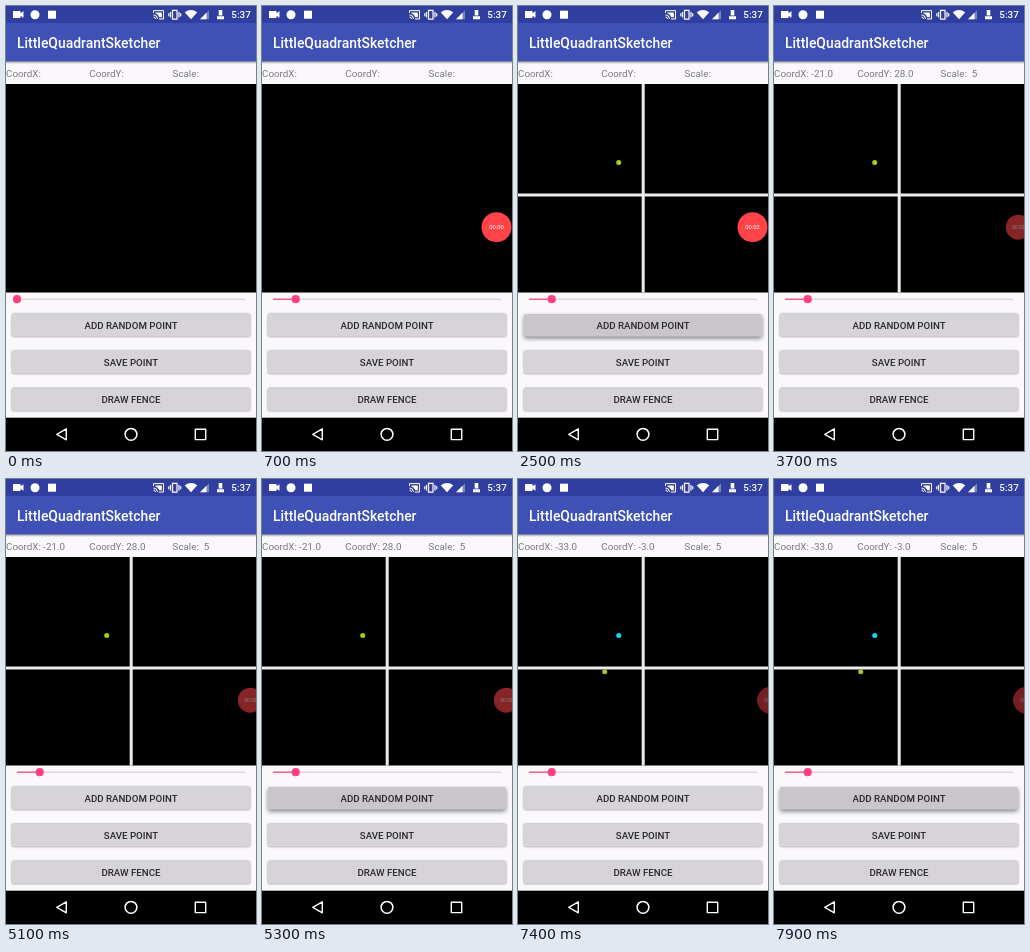
These frames come from a looping animation (250x445 px, 8000 ms). An HTML page:

```html
<!DOCTYPE html>
<html lang="en">
<head>
<meta charset="utf-8">
<title>Point plotter</title>
<style>
  html, body { margin: 0; width: 100%; height: 100%; overflow: hidden; background: #faf8fb; }
  svg { display: block; width: 100%; height: 100%; font-family: Roboto, sans-serif; }
  text { white-space: pre; }
  .label { font-size: 9.8px; fill: #7a787b; }
  .button rect { fill: #d6d4d7; filter: drop-shadow(0 .9px 1px #0007); }
  .button text { font-size: 9.7px; font-weight: 500; fill: #2a282b; text-anchor: middle; }
  .pressed rect { fill: #c9c6ca; filter: drop-shadow(0 2.2px 2px #0007); }
  .outline { fill: none; stroke: #fff; }
</style>
</head>
<body>
<svg viewBox="0 0 250 445" preserveAspectRatio="none">
  <defs>
    <linearGradient id="shade" x2="0" y2="1">
      <stop stop-color="#000" stop-opacity=".35"/>
      <stop offset="1" stop-color="#000" stop-opacity="0"/>
    </linearGradient>
  </defs>
  <rect width="250" height="445" fill="#faf8fb"/>
  <rect y="16" width="250" height="39.5" fill="#3f51b5"/>
  <rect width="250" height="17" fill="#303f9f"/>
  <rect y="55.5" width="250" height="2.5" fill="url(#shade)"/>

  <g id="status" fill="#fff">
    <path d="M7 5h7.5v2.3l3-2v6.4l-3-2V12H7z"/>
    <circle cx="29" cy="8.7" r="4.5"/>
    <rect x="42" y="4.7" width="8" height="8"/>
    <path class="outline" d="M147.5 7V4.6H157.5V13H153M147.5 9a4 4 0 0 1 4 4M147.5 11a2 2 0 0 1 2 2"/>
    <path d="M149.5 6.5h6.3v4.8h-2.5q-1-3-3.8-3.7z"/>
    <path class="outline" stroke-width="1.2" d="M166.5 4.3H171V13.2H166.5zM164.5 6v5.500M173 6v5.500M162.800 7.300v3M174.700 7.300v3"/>
    <path d="M178.700 6.200q6.300-4.500 12.600 0l-6.300 7z"/>
    <path d="M194 13.300l9-9v9z" fill-opacity=".35"/>
    <path d="M194 13.300l6.500-6.500v6.500z"/>
    <path d="M212.700 4h3.600v5.500h-3.600zM211 10.300h7v3h-7z"/>
    <text x="225.300" y="12.200" font-size="9.900" font-weight="500">5:37</text>
  </g>
  <text x="11" y="41.500" font-size="13.900" font-weight="500" fill="#fff">LittleQuadrantSketcher</text>

  <text class="label" id="coordX" x="0" y="70.500"></text>
  <text class="label" id="coordY" x="83.300" y="70.500"></text>
  <text class="label" id="scale" x="166.600" y="70.500"></text>

  <rect y="78" width="250" height="208.500" fill="#000"/>
  <path id="axes" d="M125.200 78V286.500M0 189H250" stroke="#eeeaed" stroke-width="3"/>
  <circle id="pointA" cx="100.700" cy="156.500" r="2.500"/>
  <circle id="pointB" cx="86.700" cy="192.700" r="2.500" fill="#a9c41a"/>

  <path d="M11 293.200H239" stroke="#cbc8cc"/>
  <path id="progress" stroke="#ff4081" stroke-width="1.200"/>
  <circle id="thumb" cy="293.200" r="4.100" fill="#ff4081"/>
  <g id="buttons"></g>

  <rect y="411.700" width="250" height="33.300" fill="#000"/>
  <path class="outline" stroke-width="1.400" stroke-linejoin="round"
    d="M60.300 422.800V433.800L50.800 428.300zM189.300 423.200H199.700V433.600H189.300z"/>
  <circle class="outline" cx="125" cy="428.300" r="5.900" stroke-width="1.500"/>

  <g id="bubble">
    <circle r="15" fill="#ff4448"/>
    <text id="timer" y="2" font-size="5.900" fill="#fff" text-anchor="middle"></text>
  </g>
</svg>
<script>
const LOOP = 8000, STEP = 100;
const el = id => document.getElementById(id);
const between = (t, start, end) => t >= start && t < end;
const show = (id, visible) => el(id).setAttribute('visibility', visible ? 'visible' : 'hidden');

el('buttons').innerHTML = ['ADD RANDOM POINT', 'SAVE POINT', 'DRAW FENCE'].map((name, i) =>
  `<g class="button" transform="translate(0 ${308 + 37.1 * i})">
    <rect x="6" width="238" height="22.5" rx="1.5"/>
    <text x="125" y="14.7">${name}</text>
  </g>`).join('');
const addButton = el('buttons').firstElementChild;

// Bubble poses: time, centre x, radius, opacity
const poses = [
  [0, 234.5, 15, 1], [3000, 234.5, 15, 1],
  [3200, 244.3, 12.5, .53], [6000, 244.3, 12.5, .53],
  [6100, 237.7, 12.5, .53], [6600, 252.5, 13.5, .45], [LOOP, 252.5, 13.5, .45]
];

function poseAt(t) {
  const i = poses.findIndex(p => p[0] > t);
  const a = poses[i - 1], b = poses[i];
  const u = (t - a[0]) / (b[0] - a[0]);
  const k = u * u * (3 - 2 * u);
  return a.map((v, j) => v + (b[j] - v) * k);
}

function draw(t) {
  const slide = Math.min(1, Math.max(0, t / 600));
  const thumbX = 11 + 22.7 * slide;
  el('thumb').setAttribute('cx', thumbX);
  el('progress').setAttribute('d', `M11 293.2H${thumbX}`);

  const first = t >= 2400, second = t >= 5400;
  show('axes', first);
  show('pointA', first);
  show('pointB', second);
  el('pointA').setAttribute('fill', second ? '#08dcf8' : '#a4cf12');

  const [x, y, scale] = t >= 5500 ? [' -33.0', ' -3.0', '  5']
    : t >= 2600 ? [' -21.0', ' 28.0', '  5'] : ['', '', ''];
  el('coordX').textContent = 'CoordX:' + x;
  el('coordY').textContent = 'CoordY:' + y;
  el('scale').textContent = 'Scale:' + scale;

  const pressed = between(t, 2300, 2800) || between(t, 5200, 5700) || t >= 7700;
  addButton.classList.toggle('pressed', pressed);

  const [, bubbleX, radius, opacity] = poseAt(t);
  show('bubble', t >= 200);
  el('bubble').setAttribute('transform', `translate(${bubbleX} 221.2) scale(${radius / 15})`);
  el('bubble').setAttribute('opacity', opacity);
  el('timer').textContent = '00:0' + Math.max(0, Math.floor((t - 100) / 1000));
}

const start = performance.now();
function tick() {
  const t = (performance.now() - start) % LOOP;
  draw(Math.floor(t / STEP) * STEP);
  requestAnimationFrame(tick);
}
tick();
</script>
</body>
</html>
```
